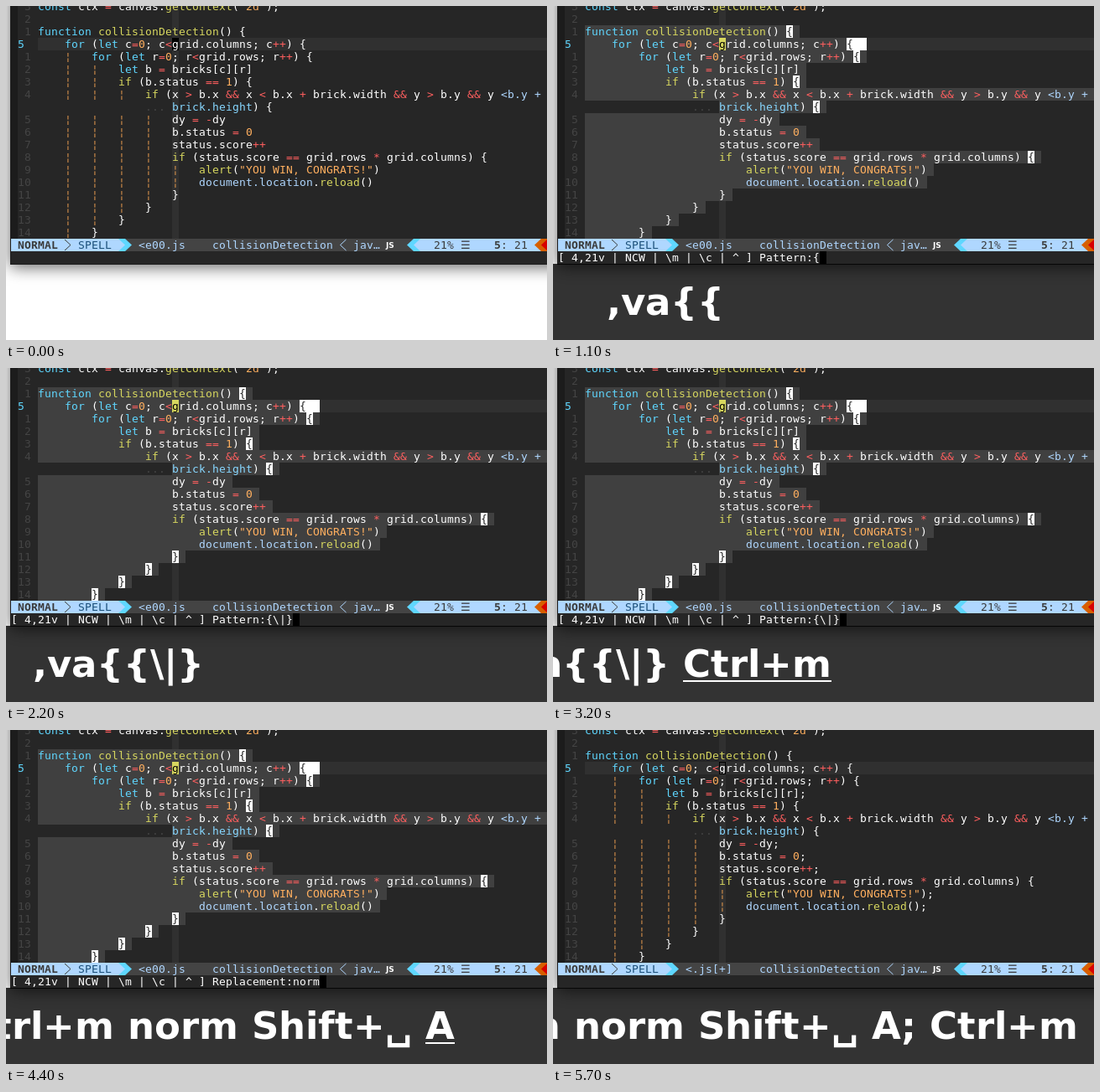
An HTML page with a canvas that plays this animation: 645 px wide and 399 px high, repeating every 5800 ms.

```html
<!DOCTYPE html>
<html lang="en">
<head>
<meta charset="utf-8">
<title>Editor demo</title>
<style>
html, body { margin: 0; width: 100%; height: 100%; overflow: hidden; background: #fff; }
canvas { display: block; width: 645px; height: 399px; }
</style>
</head>
<body>
<canvas id="stage" width="645" height="399"></canvas>
<script>
const ctx = document.getElementById('stage').getContext('2d');
const LOOP = 5800, CW = 8, RH = 15, LEFT = 6, CODE = 38, TOP = -7, W = 645;
const MONO = '"DejaVu Sans Mono", monospace', BIG = 'bold 45px "DejaVu Sans", sans-serif';
const C = {
  bg: '#262626', gutter: '#1c1c1c', line: '#303030', sel: '#404040', num: '#444444',
  bar: '#444444', text: '#ffffff', key: '#5fd7ff', cond: '#d7d75f', blue: '#afd7ff',
  tag: '#87d7ff', op: '#ff5f5f', lit: '#ffaf5f', guide: '#d7914b'
};

// [line number, indent, code]
const rows = [
  ['3', 0, 'const ctx = canvas.getContext("2d");'],
  ['2', 0, ''],
  ['1', 0, 'function collisionDetection() {'],
  ['5', 4, 'for (let c=0; c<grid.columns; c++) {'],
  ['1', 8, 'for (let r=0; r<grid.rows; r++) {'],
  ['2', 12, 'let b = bricks[c][r]'],
  ['3', 12, 'if (b.status == 1) {'],
  ['4', 16, 'if (x > b.x && x < b.x + brick.width && y > b.y && y <b.y +'],
  ['', 20, 'brick.height) {'],
  ['5', 20, 'dy = -dy'],
  ['6', 20, 'b.status = 0'],
  ['7', 20, 'status.score++'],
  ['8', 20, 'if (status.score == grid.rows * grid.columns) {'],
  ['9', 24, 'alert("YOU WIN, CONGRATS!")'],
  ['10', 24, 'document.location.reload()'],
  ['11', 20, '}'],
  ['12', 16, '}'],
  ['13', 12, '}'],
  ['14', 8, '}']
];
const CURSOR_ROW = 3, WRAP_ROW = 8, CURSOR_X = CODE + 20 * CW;

const rules = [
  [/"[^"]*"|\b\d+\b/y, C.lit],
  [/brick\.height/y, C.tag],
  [/<b\.y \+|document\.location/y, C.blue],
  [/(function|for|let|const)\b/y, C.key],
  [/if\b|\w+(?=\()/y, C.cond],
  [/[<>=+*&-]+/y, C.op],
  [/\w+|[^\w]/y, C.text]
];

// [time, text before the key, key]
const keys = [
  [200, '', ','], [400, '', 'v'], [500, '', 'a'], [600, '', '{'], [800, '', '{'],
  [1500, '', '\\'], [1700, '', '|'], [2000, '', '}'], [3200, ' ', 'Ctrl+m'],
  [3300, ' n', 'o'], [3400, 'r', 'm'], [4100, ' ', 'Shift+\u2423'],
  [4400, ' ', 'A'], [4700, '', ';'], [4800, ' ', 'Ctrl+m']
];
const underlineOff = [[1100, 1500], [2200, 3200], [3700, 4100], [5000, LOOP]];
const pending = [[0, ''], [300, ','], [500, 'g@'], [600, 'g@a'], [700, '']];
const prompts = [
  [0, ''], [700, 'Pattern:'], [900, 'Pattern:{'], [1600, 'Pattern:{\\'],
  [1800, 'Pattern:{\\|'], [2000, 'Pattern:{\\|}'], [3300, 'Replacement:no'],
  [3400, 'Replacement:norm'], [4500, 'Replacement:norm A'],
  [4700, 'Replacement:norm A;'], [4800, '']
];

const at = (table, t) => table.filter(e => e[0] <= t).pop()[1];
const isVisual = t => t >= 700 && t < 4900;

function box(color, x, y, w, h) {
  ctx.fillStyle = color;
  ctx.fillRect(x, y, w, h);
}
// One character per terminal cell.
function mono(str, x, y, color, style = '') {
  ctx.font = `${style} 13px ${MONO}`;
  ctx.fillStyle = color;
  [...str].forEach((ch, i) => ctx.fillText(ch, x + i * CW, y));
}
function wedge(color, x, dir) {
  ctx.fillStyle = color;
  ctx.beginPath();
  ctx.moveTo(x, 278);
  ctx.lineTo(x + dir * CW, 285.5);
  ctx.lineTo(x, 293);
  ctx.fill();
}
function chevron(color, x, dir) {
  ctx.strokeStyle = color;
  ctx.lineWidth = 1;
  ctx.beginPath();
  ctx.moveTo(x, 279);
  ctx.lineTo(x + dir * 7, 285.5);
  ctx.lineTo(x, 292);
  ctx.stroke();
}

function drawCode(str, x, y) {
  for (let i = 0; i < str.length;) {
    for (const [re, color] of rules) {
      re.lastIndex = i;
      const m = re.exec(str);
      if (!m) continue;
      mono(m[0], x + i * CW, y, color);
      i += m[0].length;
      break;
    }
  }
}

function drawRow(row, i, t) {
  const [num, indent, source] = row;
  const y = TOP + i * RH, base = y + 12, x = CODE + indent * CW;
  const visual = isVisual(t);
  const everything = t >= 1800 && t < 2000;
  const current = i === CURSOR_ROW;
  const closed = !source || /[{};]$| \+$/.test(source);
  const str = source + (t >= 4900 && !closed ? ';' : '');
  const end = x + str.length * CW;
  const start = i === WRAP_ROW ? x : CODE;

  if (current) box(C.line, CODE, y, W - CODE, RH);
  else box(C.line, CURSOR_X, y, CW, RH);
  if (visual && i > 1) box(C.sel, start, y, end + CW - start, RH);

  mono(num, current ? 14 : LEFT + (3 - num.length) * CW, base, current ? C.key : C.num);
  if (i === WRAP_ROW) mono('...', CODE + 16 * CW, base, C.num);
  else if (!visual)
    for (let c = 4; c < indent; c += 4) mono('\u00a6', CODE + c * CW, base, C.guide);

  if (everything) {
    box('#fff', start, y, end + CW - start, RH);
    mono(str, x, base, C.bg);
  } else {
    drawCode(str, x, base);
    if (visual && t >= 900)
      [...str].forEach((ch, k) => {
        if (ch !== '{' && (ch !== '}' || t < 2000)) return;
        box('#fff', x + k * CW, y, current ? 3 * CW : CW, RH);
        mono(ch, x + k * CW, base, C.bg);
      });
  }
  if (current) drawCursor(y, visual, t);
}

function drawCursor(y, visual, t) {
  if (t >= 5700) {
    ctx.strokeStyle = '#000';
    ctx.lineWidth = 1;
    ctx.strokeRect(CURSOR_X + .5, y + .5, CW - 1, RH - 1);
    return;
  }
  box(visual ? C.cond : '#000', CURSOR_X, y, CW, RH);
  mono('g', CURSOR_X, y + 12, visual ? '#000' : C.text);
}

function drawStatus(t) {
  const y = 290, dark = '#3a3a3a';
  box(C.bar, LEFT, 278, W, RH);
  box(C.blue, LEFT, 278, 128, RH);
  mono('NORMAL', 14, y, dark, 'bold');
  chevron(dark, 70, 1);
  mono('SPELL', 86, y, '#1c5078');
  box(C.key, 134, 278, CW, RH);
  wedge(C.blue, 134, 1);
  wedge(C.key, 142, 1);
  mono(t < 4900 ? '<e00.js' : '<.js[+]', 158, y, C.blue);
  mono('collisionDetection', 246, y, C.blue);
  chevron(C.blue, 405.5, -1);
  mono('jav\u2026', 414, y, C.blue);
  ctx.font = 'bold 9px "DejaVu Sans", sans-serif';
  ctx.fillStyle = '#fff';
  ctx.fillText('JS', 453, 289);
  wedge(C.key, 486, -1);
  box(C.key, 486, 278, CW, RH);
  box(C.blue, 494, 278, 144, RH);
  wedge(C.blue, 494, -1);
  mono('21% \u2630', 510, y, dark);
  mono('5', 582, y, dark, 'bold');
  mono(': 21', 590, y, dark);
  wedge('#d75f00', 638, -1);
  box('#d75f00', 638, 278, CW, RH);
  wedge('#d70000', 646, -1);
}

function drawCommand(t) {
  const prompt = at(prompts, t);
  const str = prompt && '[ 4,21v | NCW | \\m | \\c | ^ ] ' + prompt;
  if (isVisual(t)) box('#000', LEFT + str.length * CW, 293, CW, RH);
  mono(str, LEFT, 305, C.text);
  mono(at(pending, t), 558, 305, C.text);
}

// Glyph advances are whole pixels.
const advance = ch => Math.round(ctx.measureText(ch).width);
const width = str => [...str].reduce((sum, ch) => sum + advance(ch), 0);

function drawKeys(t) {
  const pressed = keys.filter(k => k[0] <= t);
  if (!pressed.length) return;
  box('rgba(0,0,0,.8)', 0, 308, W, 91);
  ctx.font = BIG;
  ctx.fillStyle = '#fff';
  const str = pressed.map(k => k[1] + k[2]).join('');
  const w = width(str);
  const end = Math.min(Math.floor(134 + w / 2), 626);
  let x = end - w;
  for (const ch of str) {
    ctx.fillText(ch, x, 369);
    x += advance(ch);
  }
  if (underlineOff.some(([a, b]) => t >= a && t < b)) return;
  const last = width(pressed.pop()[2]);
  ctx.fillRect(end - last, 373, last, 2);
}

function draw(t) {
  box('#fff', 0, 0, W, 399);
  ctx.save();
  ctx.shadowColor = 'rgba(0,0,0,.6)';
  ctx.shadowBlur = 18;
  ctx.shadowOffsetY = 3;
  box(C.gutter, 5, -60, 760, 369);
  ctx.restore();
  box(C.bg, LEFT, 0, W, 308);
  box(C.gutter, LEFT, 0, CW, 278);
  rows.forEach((row, i) => drawRow(row, i, t));
  drawStatus(t);
  drawCommand(t);
  drawKeys(t);
}

const began = performance.now();
function tick() {
  draw((performance.now() - began) % LOOP);
  requestAnimationFrame(tick);
}
tick();
</script>
</body>
</html>
```
